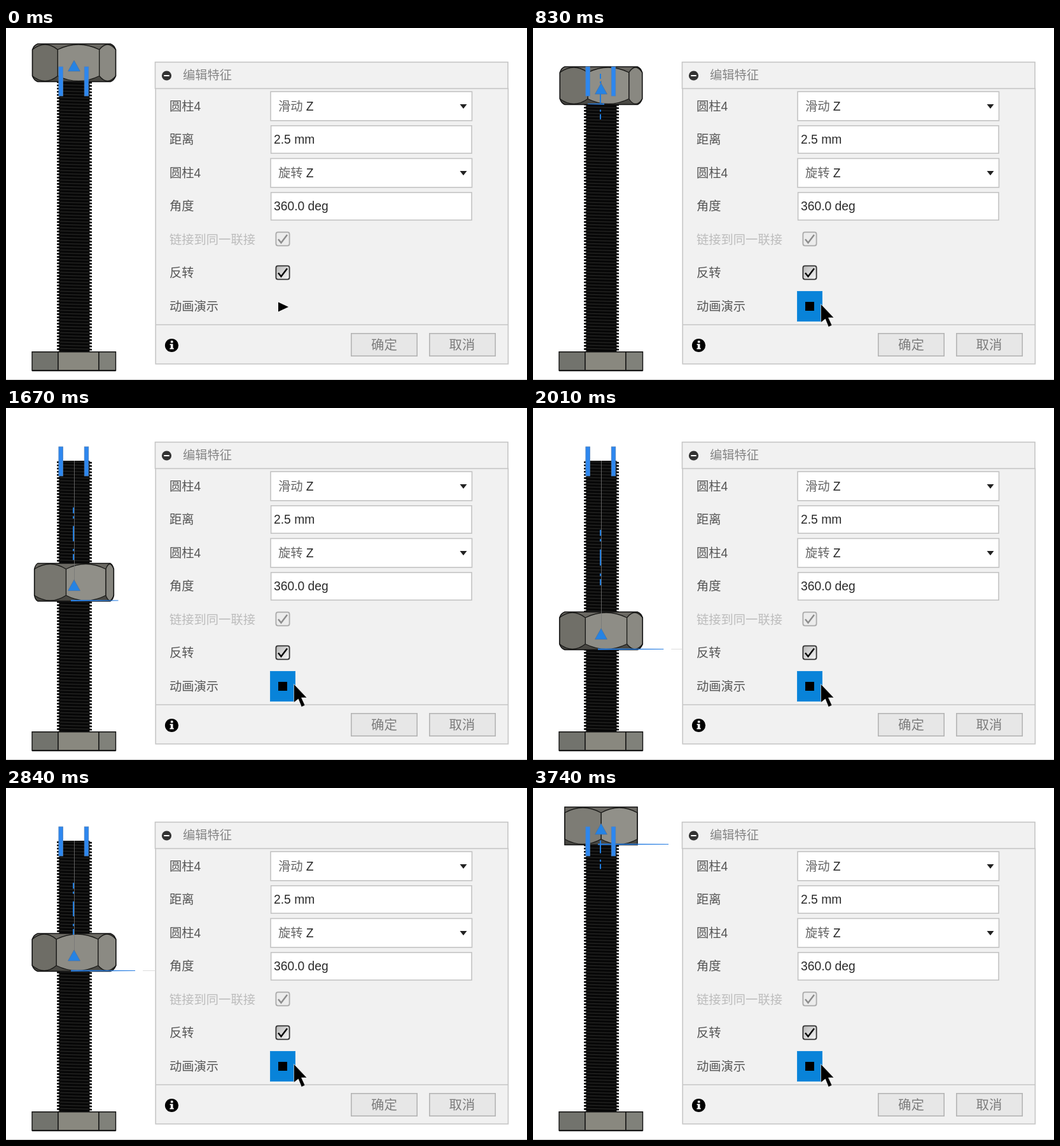
An HTML page for the animation above (3810 ms loop, 819 by 554 pixels).

```html
<!DOCTYPE html>
<html lang="zh-CN">
<head>
<meta charset="utf-8">
<title>Bolt and nut</title>
<style>
html, body { margin: 0; width: 100%; height: 100%; overflow: hidden; background: #fff; }
svg { display: block; width: 819px; height: 554px; }
text { font: 300 19.3px "Liberation Sans", "Noto Sans CJK SC", "Noto Sans CJK", sans-serif; fill: #555; white-space: pre; }
.dim { fill: #bcbcbc; }
.head { fill: #858585; }
.pick { fill: #666; }
.val { fill: #2b2b2b; }
.btn { font-size: 20.4px; fill: #7c7c7c; }
</style>
</head>
<body>
<svg viewBox="0 0 819 554">
  <defs>
    <pattern id="thread" x="80" y="83" width="55" height="5" patternUnits="userSpaceOnUse">
      <path d="M3.6 0H51.4V5H3.6z" fill="#050505"/>
      <path d="M0 1.2L3.6 .6L51.4 1.6L55 2V4.4H51.4L3.6 4L0 3.6z" fill="#0a0a0a"/>
      <path d="M5 1.2L50 2.4" stroke="#2a2a28" stroke-width="1"/>
    </pattern>
    <linearGradient id="box" x2="1" y2="1">
      <stop stop-color="#b5b5b5"/><stop offset="1" stop-color="#fafafa"/>
    </linearGradient>
    <linearGradient id="bevel" x2="0" y2="1">
      <stop stop-color="#6d6b65"/><stop offset="1" stop-color="#474641"/>
    </linearGradient>
  </defs>
  <rect width="819" height="554" fill="#fff"/>
  <path d="M0 553.5H819" stroke="#c9c9c9"/>

  <rect x="80" y="83" width="55" height="428" fill="url(#thread)"/>
  <g stroke="#111" stroke-width="1.4">
    <path d="M41 509.7H82V539H41z" fill="#72736d"/>
    <path d="M82 509.7H146V539H82z" fill="#89887f"/>
    <path d="M146 509.7H172.5V539H146z" fill="#80817a"/>
    <path d="M41 539.3H172.5" stroke-width="2"/>
  </g>
  <g id="nut"></g>
  <g id="marks"></g>
  <g fill="#2d87ef" stroke="#4f81ba" stroke-width=".8">
    <rect x="82.9" y="61" width="6.6" height="46"/>
    <rect x="123.2" y="61" width="6.6" height="46"/>
  </g>
  <path id="tip" d="M107 26L116.5 43H97.5z" fill="#2583e4" stroke="#4a6f9c" stroke-width=".7"/>

  <g fill="#f1f1f1" stroke="#c6c6c6" stroke-width="1.6">
    <rect x="235.2" y="95.3" width="554.2" height="433.4"/>
    <rect x="234.5" y="53.7" width="554.5" height="41.6"/>
    <path d="M235 467H789.5"/>
  </g>
  <circle cx="252.5" cy="75" r="7.6" fill="#333"/>
  <path d="M248.3 75H256.7" stroke="#fff" stroke-width="2"/>
  <g fill="#fff" stroke="#c3c3c3" stroke-width="1.6">
    <rect x="416" y="100.2" width="316.5" height="45.6"/>
    <rect x="416.6" y="153.8" width="315.4" height="43.4"/>
    <rect x="416" y="205.4" width="316.5" height="45.4"/>
    <rect x="416.6" y="258.9" width="315.4" height="43.4"/>
  </g>
  <path d="M713.5 120H724.5L719 127zM713.5 225H724.5L719 232z" fill="#222"/>
  <g stroke-width="1.8">
    <rect x="424.4" y="321.4" width="21.2" height="21.2" rx="3" fill="#ececec" stroke="#aaa"/>
    <rect x="424.4" y="374.4" width="21.2" height="21.2" rx="3" fill="url(#box)" stroke="#333"/>
  </g>
  <g fill="none" stroke-width="2.4">
    <path d="M428 332.5L432.5 338L442 325.5" stroke="#8c8c8c"/>
    <path d="M428 385.5L432.5 391L442 378.5" stroke="#000"/>
  </g>
  <rect id="hot" x="415.5" y="414.5" width="39" height="47" fill="#0883d9" stroke="#1a8cdd"/>
  <path id="play" d="M428 431.5L444 439L428 446.5z"/>
  <rect id="stop" x="428" y="431" width="14" height="14"/>
  <circle cx="260.5" cy="499.5" r="10.6"/>
  <path d="M258.9 492.3H262.5V495.6H258.9zM257.6 497.2H262.5V503.8H263.8V505.6H257.4V503.8H258.9V499H257.6z" fill="#fff"/>
  <g fill="#e7e7e7" stroke="#b4b4b4" stroke-width="1.6">
    <rect x="542.8" y="480.8" width="103.4" height="35.4"/>
    <rect x="665.8" y="480.8" width="103.4" height="35.4"/>
  </g>
  <g id="labels"></g>
  <path id="cursor" d="M0 0V29L7 23.5L12 36L17.5 33.5L12 21.5H20.5z" fill="#000" stroke="#fff" stroke-width=".6"/>
</svg>
<script>
const LOOP = 3810, STEPS = 55, CX = 107, R = 66, H = 59.5, BEVEL = 9, ARM = 106;
const FLAT = R * Math.cos(Math.PI / 6);
const $ = id => document.getElementById(id);
const rad = d => d * Math.PI / 180;
const f = n => n.toFixed(2);
const show = (id, on) => $(id).setAttribute("visibility", on ? "visible" : "hidden");
const move = (id, x, y) => $(id).setAttribute("transform", `translate(${f(x)} ${f(y)})`);

$("labels").innerHTML = [
  [278, 81, "编辑特征", "head"],
  [257, 130, "圆柱4"], [428, 130, "滑动", "pick"], [471.8, 130, "Z", "val"],
  [257, 182, "距离"], [421, 182, "2.5 mm", "val"],
  [257, 235, "圆柱4"], [428, 235, "旋转", "pick"], [471.8, 235, "Z", "val"],
  [257, 287, "角度"], [421, 287, "360.0 deg", "val"],
  [257, 340, "链接到同一联接", "dim"],
  [257, 392, "反转"], [257, 445, "动画演示"],
  [574, 506, "确定", "btn"], [696.5, 506, "取消", "btn"]
].map(([x, y, s, c = ""]) => `<text x="${x}" y="${y}" class="${c}">${s}</text>`).join("");

// step, top of the nut, turn in degrees
const KEYS = [
  [9.6, 25, 23], [12, 61, -101.5], [19, 168, -480], [29, 321, -1058],
  [31.9, 365, -1216], [36, 304, -928.5], [46, 154, -461.5], [54, 30, 0]
];

function pose(k) {
  if (k <= KEYS[0][0]) return KEYS[0].slice(1);
  const i = Math.max(1, KEYS.findIndex(q => q[0] >= k));
  const a = KEYS[i - 1], b = KEYS[i], p = (k - a[0]) / (b[0] - a[0]);
  return [a[1] + (b[1] - a[1]) * p, a[2] + (b[2] - a[2]) * p];
}

function nut(y, turn) {
  const xs = [], faces = [], b = y + H;
  for (let j = 0; j < 6; j++) {
    const a = turn + 30 + j * 60, n = a + 30;
    const x2 = CX + R * Math.cos(rad(a)), x1 = CX + R * Math.cos(rad(a + 60));
    xs.push(x2);
    if (x2 - x1 < 0.5) continue;
    const v = Math.round(108 + 37 * Math.cos(rad(n - 58))), m = f((x1 + x2) / 2);
    faces.push(`<path fill="rgb(${v},${v - 1},${v - 8})" d="M${f(x1)} ${f(y + BEVEL)}Q${m} ${f(y - BEVEL + 2)} ${f(x2)} ${f(y + BEVEL)}V${f(b - BEVEL)}Q${m} ${f(b + BEVEL - 2)} ${f(x1)} ${f(b - BEVEL)}z"/>`);
  }
  const l = Math.min(...xs), r = Math.max(...xs), fl = CX - FLAT, fr = CX + FLAT;
  // rounded shoulder between the flat top and the outer edge
  const bend = (flat, edge) => f(flat + (edge - flat) * .7);
  const outline = `M${f(fl)} ${f(y)}H${f(fr)}Q${bend(fr, r)} ${f(y + 2)} ${f(r)} ${f(y + BEVEL)}V${f(b - BEVEL)}` +
    `Q${bend(fr, r)} ${f(b - 2)} ${f(fr)} ${f(b)}H${f(fl)}Q${bend(fl, l)} ${f(b - 2)} ${f(l)} ${f(b - BEVEL)}` +
    `V${f(y + BEVEL)}Q${bend(fl, l)} ${f(y + 2)} ${f(fl)} ${f(y)}z`;
  return `<path d="${outline}" fill="url(#bevel)"/><g stroke="#1a1a18" stroke-width="1.3">${faces.join("")}</g>` +
    `<path d="${outline}" fill="none" stroke="#111" stroke-width="1.4"/>`;
}

function marks(y, turn) {
  const line = (x1, y1, x2, y2, c, w) =>
    `<path d="M${f(x1)} ${f(y1)}L${f(x2)} ${f(y2)}" stroke="${c}" stroke-width="${w}"/>`;
  let s = "";
  if (y > 58) s += line(CX + .5, 83, CX + .5, y + 27, "#777", .8);
  // dash-dot axis halfway between the joint and the nut
  const mid = 78 + .49 * y, u = (34 + .03 * y) / 45;
  for (const [a, b] of [[-45, -35], [-30, -26], [-13, 13], [26, 30], [35, 45]])
    s += line(CX - 1, mid + a * u, CX - 1, mid + b * u, "#1f7de0", 2);
  const c = Math.cos(rad(turn)), d = Math.sin(rad(turn)), by = y + 58.5, end = CX + ARM * c;
  const root = f(CX - 5 * Math.sign(c));
  if (c < 0 && d > 0) s += line(CX, by, end, by, "#7d8798", 1);
  else s += `<path d="M${root} ${f(by - 1)}L${f(end)} ${f(by - .5)}V${f(by + .6)}L${root} ${f(by + 1.3)}z" fill="#2a7fe2"/>`;
  if (c > .9 && d > 0) s += line(end + 12, by, 234, by, "#ddd", 1);
  return s;
}

function draw(t) {
  const k = Math.min(STEPS - 1, Math.floor((t + 5) / (LOOP / STEPS)));
  const [y, turn] = pose(k);
  $("nut").innerHTML = nut(y, turn);
  $("marks").innerHTML = k >= 10 ? marks(y, turn) : "";
  move("tip", 0, y);
  const p = 1 - (1 - Math.min(1, Math.max(0, (k - 1) / 6))) ** 2;
  move("cursor", 641 - 188.5 * p, 540 - 105.5 * p);
  show("cursor", k >= 1);
  show("hot", k >= 7);
  show("play", k < 9);
  show("stop", k >= 9);
}

function tick() {
  draw(performance.now() % LOOP);
  requestAnimationFrame(tick);
}
tick();
</script>
</body>
</html>
```
